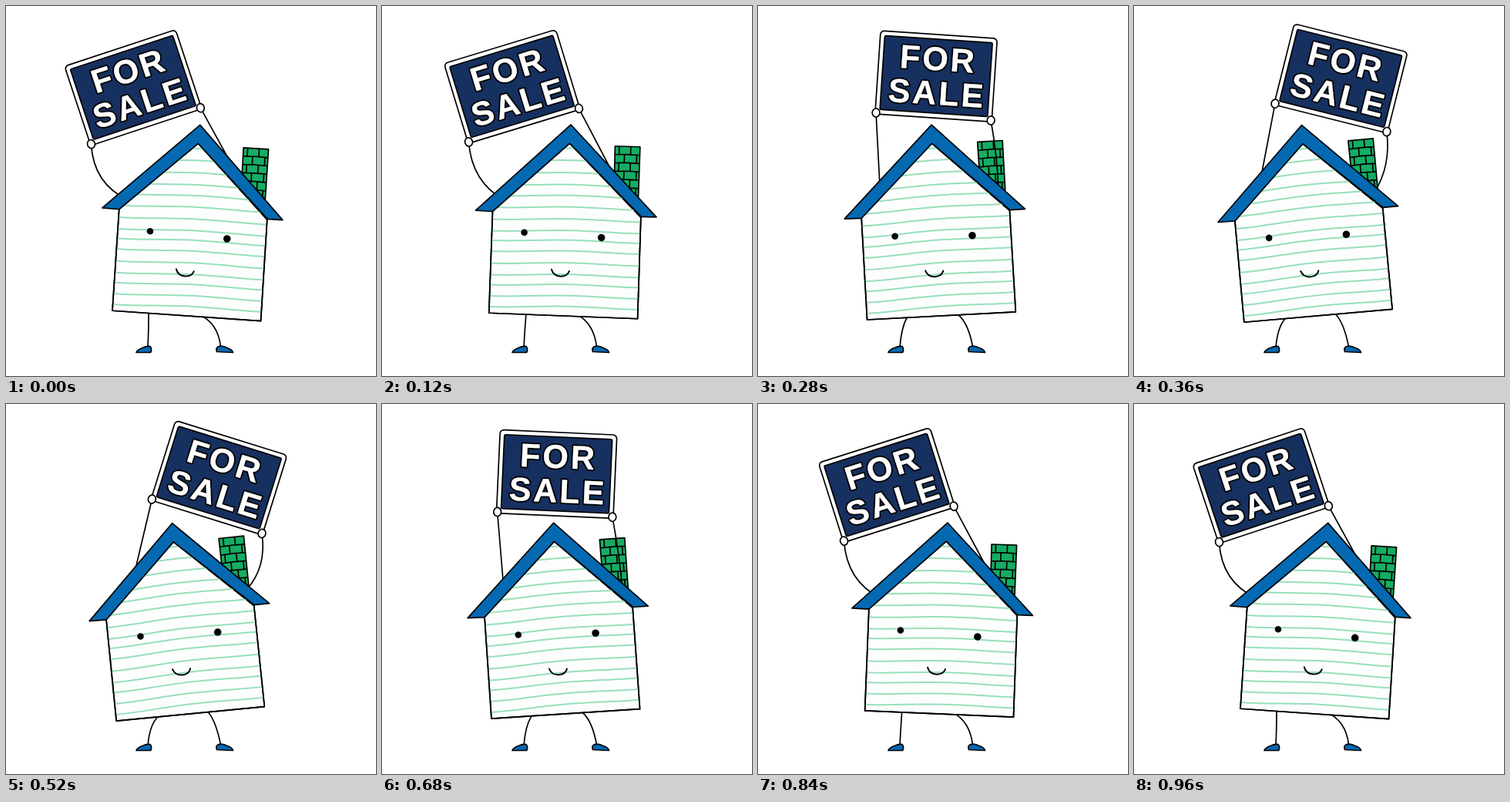
An HTML page that plays this animation: 480x480 px, repeating every 1000 ms.

```html
<!DOCTYPE html>
<html lang="en">
<head>
<meta charset="utf-8">
<title>House for sale</title>
<style>
  html, body { margin: 0; width: 100%; height: 100%; overflow: hidden; background: #fff; }
  svg { display: block; width: 100vw; height: 100vh; }
  .ink { stroke: #000; stroke-width: 1.7; stroke-linejoin: round; stroke-linecap: round; }
  .line { fill: none; }
  .blue { fill: #0569b2; }
  text { font: bold 43px "Liberation Sans", Arial, sans-serif; letter-spacing: 3px; text-anchor: middle; stroke-linejoin: round; }
</style>
</head>
<body>
<svg viewBox="0 0 480 480">
  <defs>
    <clipPath id="wallClip"><path d="M140.3 268.7L237.5 178L332.8 271.3L332.6 402.8L139.6 401.2Z"/></clipPath>
    <clipPath id="stackClip"><path d="M296.5 179.8H329L328.7 244.5L296.8 225Z"/></clipPath>
    <g id="words">
      <text x="1.4" y="-8">FOR</text>
      <text x="2.5" y="36.5">SALE</text>
    </g>
  </defs>

  <path id="legL" class="ink line"/>
  <path id="legR" class="ink line"/>
  <path class="ink blue" d="M169 449.5Q170 446 177 443.5Q182 441 187 441.5Q190 445 187.5 449.5Z"/>
  <path class="ink blue" d="M273.5 448.5Q271.5 443 276 441.5Q281 440 287 443.5Q294 446 294.5 449.5Z"/>

  <g id="stack">
    <path class="ink" fill="#14ad63" d="M296.5 179.8H329L328.7 244.5L296.8 225Z"/>
    <path id="bricks" class="ink line" clip-path="url(#stackClip)"/>
  </g>

  <path id="armL" class="ink line"/>
  <path id="armR" class="ink line"/>

  <g id="house">
    <path class="ink" fill="#fcfefd" d="M140.3 268.7L237.5 178L332.8 271.3L332.6 402.8L139.6 401.2Z"/>
    <path id="siding" fill="none" stroke="#98dfba" stroke-width="2" clip-path="url(#wallClip)"/>
    <path class="ink line" d="M140.3 268.7L139.6 401.2L332.6 402.8L332.8 271.3"/>
    <path class="ink blue" d="M118.3 268.8L238.4 153.8L352.9 270.3L333.3 270.3L237.5 178L140.3 269.4Z"/>
    <g id="open">
      <circle cx="182.2" cy="295.4" r="4.3"/>
      <circle id="eyeR" cx="282.4" r="4.8"/>
    </g>
    <path id="shut" class="ink" style="stroke-width:2.4" d="M175.3 297.3H189.5M275.3 300.6H289.7"/>
    <path class="ink line" style="stroke-width:2" d="M219 342.2Q221.5 350.6 231 350.8Q240 350.6 242 343.8"/>
  </g>

  <g id="sign">
    <rect class="ink" fill="#fff" x="-75.8" y="-54.3" width="151.6" height="108.3" rx="5"/>
    <rect class="ink" fill="#16305f" x="-70" y="-48.3" width="140" height="96" rx="2"/>
    <use href="#words" fill="#000" stroke="#000" stroke-width="4"/>
    <use href="#words" fill="#fff" stroke="#fff" stroke-width="0.4"/>
    <ellipse class="ink" fill="#fff" cx="-74.7" cy="52.3" rx="4.9" ry="5.6"/>
    <ellipse class="ink" fill="#fff" cx="74.7" cy="52.3" rx="4.9" ry="5.6"/>
  </g>
</svg>
<script>
const LOOP = 1000, STEP = 40;
const $ = id => document.getElementById(id);
const set = (id, name, value) => $(id).setAttribute(name, value);
const clamp = x => Math.min(1, Math.max(0, x));
const smooth = x => x * x * (3 - 2 * x);
const smoother = x => x * x * x * (10 - 15 * x + 6 * x * x);
const span = (t, a, b) => clamp((t - a) / (b - a));

// Sign centre for each tilt: [degrees, x, y]
const swing = [[-18.3, 165, 106], [-9.7, 188.4, 97.3], [2.7, 227, 91], [13.8, 267.5, 94], [17.35, 276.3, 95.8]];

function signCentre(tilt) {
  let i = 0;
  while (i < swing.length - 2 && tilt > swing[i + 1][0]) i++;
  const [a, ax, ay] = swing[i], [b, bx, by] = swing[i + 1];
  const k = (tilt - a) / (b - a);
  return [ax + (bx - ax) * k, ay + (by - ay) * k];
}

function buildSiding() {
  const rows = [186, 201.5, 217.5, 233, 247, 262, 277.5, 292.5, 305, 319, 334.5, 349.5, 362.5, 377, 391];
  return rows.map(y =>
    `M138 ${y + 2}C180 ${y + 2.5} 200 ${y - 1.5} 245 ${y - 1.5}S305 ${y + 0.5} 335 ${y}`
  ).join("");
}

function buildBricks() {
  let d = "";
  for (let r = 0; r < 6; r++) {
    const y = 180 + r * 10.8;
    d += `M296 ${y + 10.8}l17 -0.6L330 ${y + 10.8}`;
    for (const x of r % 2 ? [309, 325] : [302, 317]) d += `M${x} ${y}v10.5`;
  }
  return d;
}

// Curved limb from a to b, its control point pushed off the midpoint
function limb(a, b, dx, dy) {
  return `M${a}Q${(a[0] + b[0]) / 2 + dx} ${(a[1] + b[1]) / 2 + dy} ${b}`;
}

function draw(t) {
  const lean = 3.5 - 9.5 * (smooth(span(t, 8, 418)) - smoother(span(t, 545, 965)));
  const tilt = -18.3 + 35.65 * (smoother(span(t, 50, 457)) - smoother(span(t, 502, 894)));

  const turn = `rotate(${lean} 236 372)`;
  set("house", "transform", turn);
  set("stack", "transform", turn);

  const blink = t >= 140 && t < 260;
  set("open", "visibility", blink ? "hidden" : "visible");
  set("shut", "visibility", blink ? "visible" : "hidden");
  set("eyeR", "cy", t < 140 ? 299 : 300.4);

  const [cx, cy] = signCentre(tilt);
  set("sign", "transform", `translate(${cx} ${cy}) rotate(${tilt})`);

  const c = Math.cos(tilt * Math.PI / 180), s = Math.sin(tilt * Math.PI / 180);
  const hand = x => [cx + x * c - 52.3 * s, cy + x * s + 52.3 * c];
  const bendL = Math.max(0, -1.7 * (tilt + 3));
  const bendR = Math.max(0, 0.95 * tilt);
  set("armL", "d", limb(hand(-74.7), [159, 252], -0.82 * bendL, 0.6 * bendL));
  set("armR", "d", limb(hand(74.7), [312, 241], bendR, 0.45 * bendR));

  set("legL", "d", `M${189 - 1.15 * lean} ${401 - lean}Q${185.5 - 0.1 * lean} 418 184 443`);
  set("legR", "d", `M${254.5 - 1.3 * lean} 400Q${274 + 0.3 * lean} 411 278.5 442`);
}

set("siding", "d", buildSiding());
set("bricks", "d", buildBricks());

const start = performance.now();
function tick() {
  const t = (performance.now() - start) % LOOP;
  draw(Math.floor(t / STEP) * STEP);
  requestAnimationFrame(tick);
}
tick();
</script>
</body>
</html>
```
